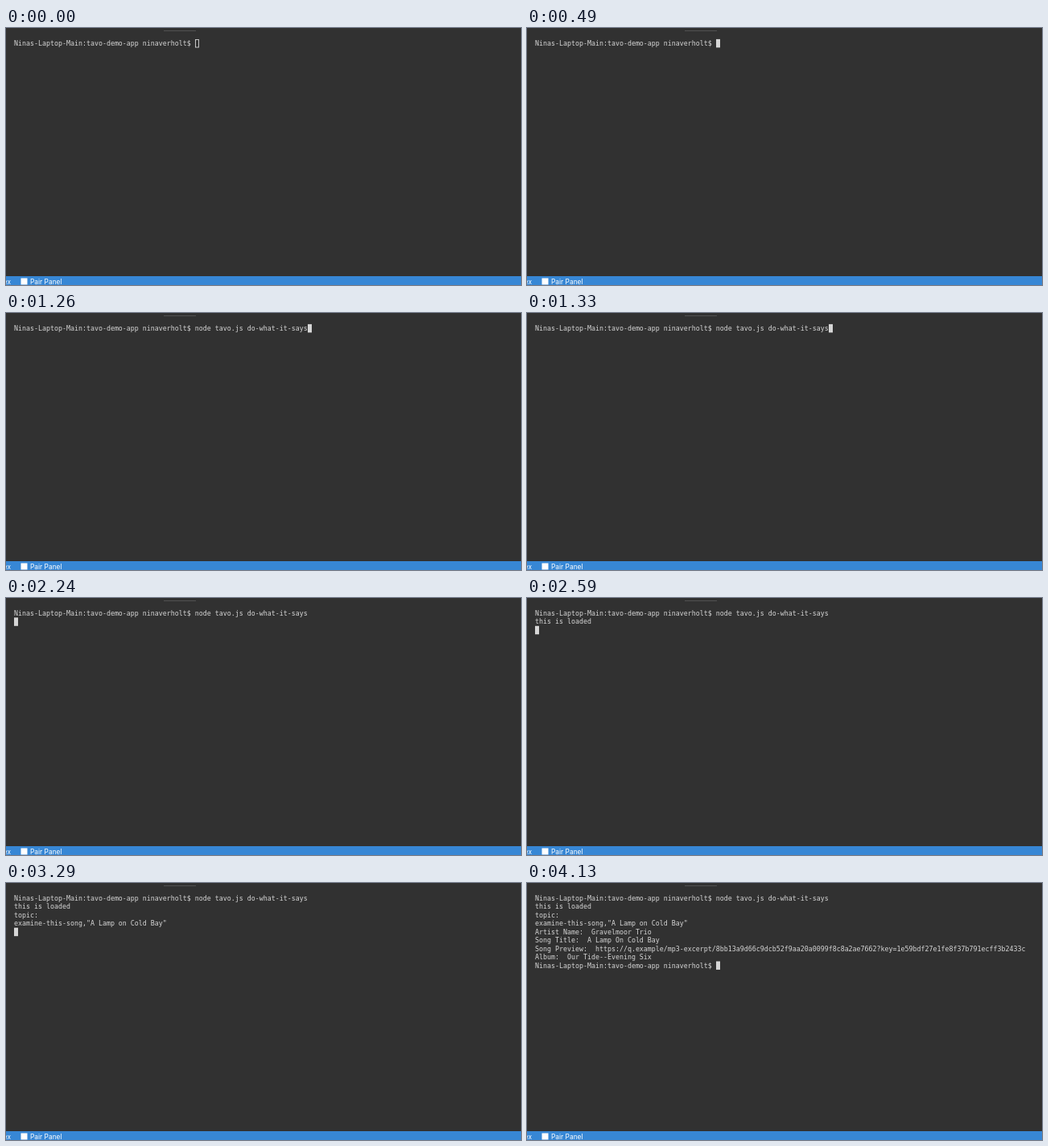
Animation of 640 by 320 pixels, one loop 6370 ms. Source, as an HTML page with a canvas:

```html
<!DOCTYPE html>
<html lang="en">
<head>
<meta charset="utf-8">
<title>Terminal session</title>
<style>
  html, body { margin: 0; width: 100%; height: 100%; overflow: hidden; background: #313131; }
  canvas { display: block; width: 640px; height: 320px; }
</style>
</head>
<body>
<canvas id="stage" width="640" height="320"></canvas>
<script>
const ctx = document.getElementById('stage').getContext('2d');

const LOOP = 6370;
const LEFT = 10, TOP = 13.9, COL = 5, ROW = 10.45;
const MONO = '8.305px "DejaVu Sans Mono", monospace';
const SANS = '8.4px Inter, sans-serif';
const INK = '#d6d6d6';

// Seeded hex string for the preview link.
function hex(length, seed) {
  let out = '';
  while (out.length < length) {
    seed = (seed * 16807) % 2147483647;
    out += ((seed >> 8) & 15).toString(16);
  }
  return out;
}

const prompt = 'Ninas-Laptop-Main:tavo-demo-app ninaverholt$ ';
const command = prompt + 'node tavo.js do-what-it-says';
const loaded = [command, 'this is loaded'];
const topic = [...loaded, 'topic:', 'examine-this-song,"A Lamp on Cold Bay"'];
const result = [
  ...topic,
  'Artist Name:  Gravelmoor Trio',
  'Song Title:  A Lamp On Cold Bay',
  `Song Preview:  https://q.example/mp3-excerpt/${hex(40, 4711)}?key=${hex(32, 90210)}`,
  'Album:  Our Tide--Evening Six',
  prompt
];

// The cursor sits at the end of the last line.
const steps = [
  { at: 0, lines: [prompt], hollow: true },
  { at: 490, lines: [prompt] },
  { at: 910, lines: [prompt + 'clear'] },
  { at: 1260, lines: [command] },
  { at: 2240, lines: [command, ''] },
  { at: 2590, lines: [...loaded, ''] },
  { at: 3290, lines: [...topic, ''] },
  { at: 4130, lines: result }
];

function rect(x, y, w, h, color) {
  ctx.fillStyle = color;
  ctx.fillRect(x, y, w, h);
}

function text(str, x, y, font, color, align = 'left') {
  ctx.font = font;
  ctx.fillStyle = color;
  ctx.textAlign = align;
  ctx.fillText(str, x, y);
}

function drawCursor(lines, hollow) {
  const row = lines.length - 1;
  const x = LEFT + lines[row].length * COL;
  const y = TOP + row * ROW;
  if (hollow) {
    ctx.strokeStyle = INK;
    ctx.lineWidth = 0.9;
    ctx.strokeRect(x + 0.5, Math.round(y) + 0.5, COL - 1, 9.5);
  } else {
    rect(x, y, COL, ROW, INK);
  }
}

function drawStatusBar() {
  rect(0, 309, 640, 11, '#3787d5');
  text('ex', 6, 319, SANS, '#fff', 'right');
  rect(18.5, 311.5, 8, 8, '#fff');
  text('Pair Panel', 30, 319, SANS, '#fff');
}

function draw(time) {
  const step = steps.filter(s => s.at <= time).pop();
  rect(0, 0, 640, 320, '#313131');
  rect(196, 3, 40, 1, '#515151');
  step.lines.forEach((line, i) => text(line, LEFT, TOP + i * ROW + 8.1, MONO, INK));
  drawCursor(step.lines, step.hollow);
  drawStatusBar();
}

const start = performance.now();
function frame() {
  draw((performance.now() - start) % LOOP);
  requestAnimationFrame(frame);
}
frame();
</script>
</body>
</html>
```
